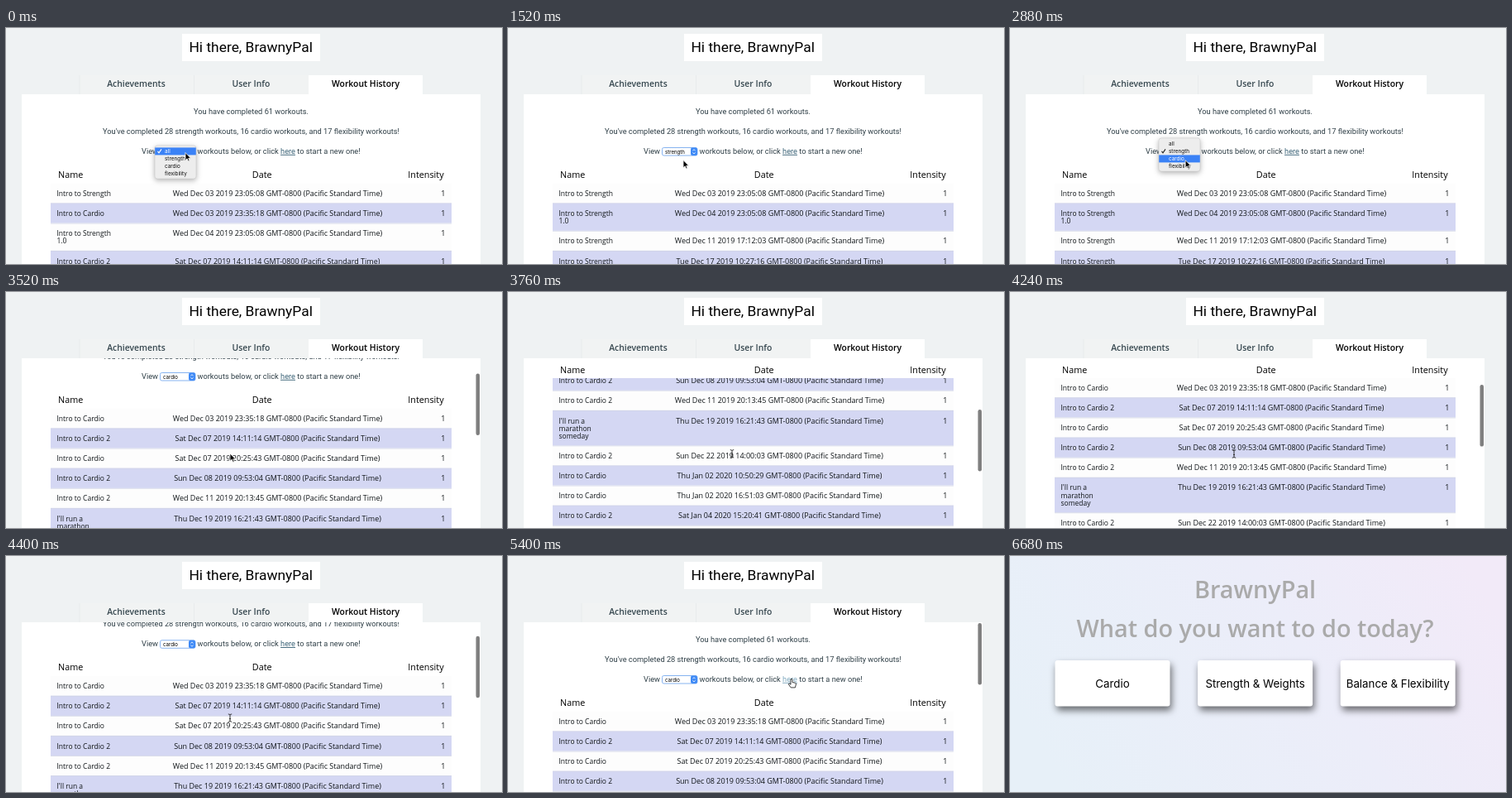
Animation, 600 px wide and 285 px high, one loop 7480 ms. Source, as an HTML page:

```html
<!DOCTYPE html>
<html lang="en">
<head>
<meta charset="utf-8">
<title>Workout history</title>
<style>
  html, body { margin: 0; width: 100%; height: 100%; overflow: hidden; }
  svg { display: block; width: 600px; height: 285px; }
  text { white-space: pre; }
  .mid { text-anchor: middle; }
  .end { text-anchor: end; }
  .hello { font: 17.4px Roboto, sans-serif; }
  .tab { font: 600 10.4px "Open Sans", sans-serif; fill: #36474f; }
  .copy { font: 9.25px Roboto, sans-serif; fill: #2f3f47; }
  .head { font: 10.8px "Open Sans", sans-serif; }
  .name { font: 8.5px "Open Sans", sans-serif; fill: #101518; }
  .date { font: 9px "Open Sans", sans-serif; fill: #101518; }
  .menu { font: 6.4px Inter, sans-serif; }
  .value { font: 6.1px Inter, sans-serif; }
  .title { font: 600 28.8px "Open Sans", sans-serif; fill: #aaa; }
  .card rect { fill: #fff; filter: drop-shadow(2.5px 5px 4px rgba(0, 0, 0, .55)); }
  .card text { font: 13.3px Inter, sans-serif; text-anchor: middle; }
  #popup { filter: drop-shadow(0 2px 3px rgba(0, 0, 0, .3)); }
  #link { text-decoration: underline; }
</style>
</head>
<body>
<svg viewBox="0 0 600 285">
  <defs>
    <clipPath id="panel"><path d="M19 80H574V285H19Z"/></clipPath>
    <linearGradient id="sky" x1="0" y1=".6" x2="1" y2=".3">
      <stop offset="0" stop-color="#e7f0f8"/>
      <stop offset=".6" stop-color="#ecedf9"/>
      <stop offset="1" stop-color="#f2eaf8"/>
    </linearGradient>
  </defs>

  <g id="history">
    <path fill="#eff2f3" d="M0 0H600V285H0Z"/>
    <path fill="#fff" d="M213 7H380V40H213Z"/>
    <text class="hello mid" x="296.2" y="29">Hi there, BrawnyPal</text>
    <path fill="#f1f3f3" d="M89 57H366V80H89Z"/>
    <path stroke="#e8ebec" d="M89 57V80M227.5 57V80"/>
    <path fill="#fff" d="M366 57H504V80H366ZM19 80H574V285H19Z"/>
    <text class="tab mid" x="157.5" y="71.3">Achievements</text>
    <text class="tab mid" x="296.5" y="71.3">User Info</text>
    <text class="tab mid" x="435" y="71.3" style="fill:#000">Workout History</text>

    <g clip-path="url(#panel)">
      <g id="content">
        <text class="copy mid" x="296.5" y="103.8">You have completed 61 workouts.</text>
        <text class="copy mid" x="296.5" y="127.8">You've completed 28 strength workouts, 16 cardio workouts, and 17 flexibility workouts!</text>
        <text class="copy" x="164" y="151.8">View</text>
        <text class="copy" x="231.5" y="151.8">workouts below, or click <tspan id="link">here</tspan> to start a new one!</text>
        <rect x="186.5" y="144.5" width="42.5" height="9.5" rx="2" fill="#fff" stroke="#86b3f0"/>
        <rect x="221" y="144.5" width="8" height="9.5" rx="2" fill="#3f8af6"/>
        <path fill="none" stroke="#fff" stroke-width=".8" d="M223.5 148.3L225 146.6L226.5 148.3M223.5 150.3L225 152L226.5 150.3"/>
        <text id="value" class="value" x="190" y="151.5"></text>
        <g id="tables"></g>
      </g>
      <g id="header">
        <path fill="#fff" d="M54 163H539V187H54Z"/>
        <text class="head" x="63" y="180.8">Name</text>
        <text class="head mid" x="309.7" y="180.8">Date</text>
        <text class="head end" x="529.6" y="180.8">Intensity</text>
      </g>
      <rect id="thumb" x="568.5" width="4.5" height="74.5" rx="2.2" fill="#7f7f7f"/>
    </g>

    <g id="popup">
      <rect x="180" width="50" height="40" rx="3" fill="#ededed" stroke="#c4c4c4" stroke-width=".5"/>
      <rect id="bar" x="180.2" width="49.6" height="9" fill="#3b82f6"/>
      <path id="check" fill="none" stroke-width="1.1" d="M183.5 6.8L185 8.8L188 4.4"/>
      <g id="items"></g>
    </g>
  </g>

  <g id="picker">
    <path fill="url(#sky)" d="M0 0H600V285H0Z"/>
    <text class="title mid" x="296.5" y="51">BrawnyPal</text>
    <text class="title mid" x="296.5" y="97.6">What do you want to do today?</text>
    <g id="cards"></g>
  </g>

  <g id="cursor" stroke-linejoin="round">
    <path id="arrow" stroke="#fff" stroke-width=".8" d="M0 0V9.3L2.1 7.3L3.6 10.6L5.1 9.9L3.7 6.8H6.6Z"/>
    <path id="beam" fill="none" stroke="#222" stroke-width=".9" d="M-2.2 -4.5Q0 -4.5 0 -3.3Q0 -4.5 2.2 -4.5M0 -3.3V3.6M-2.2 4.8Q0 4.8 0 3.6Q0 4.8 2.2 4.8M-1 1.2H1"/>
    <path id="hand" fill="#fff" stroke="#111" stroke-width=".8" d="M-1 -1.5Q0 -3.2 1 -1.5V2L4.6 2.8Q5.6 3.1 5.4 4.5L4.4 8.4H-.8L-3.6 4.6Q-3.6 3.2 -2.3 3.6L-1 4.8Z"/>
  </g>
</svg>

<script>
const LOOP = 7480, PICK1 = 880, OPEN2 = 2080, PICK2 = 3080, NAVIGATE = 5440;
const ROW = 24.1, LINE = 9.2, TOP = 187.5, STICKY = 83;
const $ = id => document.getElementById(id);
const show = (id, on) => $(id).setAttribute('visibility', on ? 'inherit' : 'hidden');
const shift = (id, x, y) => $(id).setAttribute('transform', `translate(${x} ${y})`);

const options = ['all', 'strength', 'cardio', 'flexibility'];
const S = 'Intro to Strength', S1 = S + '|1.0', C = 'Intro to Cardio', C2 = C + ' 2';
const workouts = {
  all: [
    [S, 'Wed Dec 03 2019 23:05:08'], [C, 'Wed Dec 03 2019 23:35:18'],
    [S1, 'Wed Dec 04 2019 23:05:08'], [C2, 'Sat Dec 07 2019 14:11:14']
  ],
  strength: [
    [S, 'Wed Dec 03 2019 23:05:08'], [S1, 'Wed Dec 04 2019 23:05:08'],
    [S, 'Wed Dec 11 2019 17:12:03'], [S, 'Tue Dec 17 2019 10:27:16']
  ],
  cardio: [
    [C, 'Wed Dec 03 2019 23:35:18'], [C2, 'Sat Dec 07 2019 14:11:14'],
    [C, 'Sat Dec 07 2019 20:25:43'], [C2, 'Sun Dec 08 2019 09:53:04'],
    [C2, 'Wed Dec 11 2019 20:13:45'], ["I'll run a|marathon|someday", 'Thu Dec 19 2019 16:21:43'],
    [C2, 'Sun Dec 22 2019 14:00:03'], [C, 'Thu Jan 02 2020 10:50:29'],
    [C, 'Thu Jan 02 2020 16:51:03'], [C2, 'Sat Jan 04 2020 15:20:41'],
    [C, 'Mon Jan 06 2020 18:02:37']
  ]
};

function table(kind) {
  let y = TOP;
  const rows = workouts[kind].map(([name, date], i) => {
    const lines = name.split('|'), h = ROW + LINE * (lines.length - 1), base = y + 15.5;
    const row = `<rect x="54" y="${y}" width="485" height="${h}" fill="${i % 2 ? '#d4d7f3' : '#fdfdfd'}"/>` +
      lines.map((s, n) => `<text class="name" x="61.5" y="${base + n * LINE}">${s}</text>`).join('') +
      `<text class="date mid" x="328.5" y="${base}">${date} GMT-0800 (Pacific Standard Time)</text>` +
      `<text class="date end" x="531.5" y="${base}">1</text>`;
    y += h;
    return { row, line: `M54 ${y + .3}H539` };
  });
  return `<g id="${kind}">${rows.map(r => r.row).join('')}` +
    `<path stroke="#d0d3e6" stroke-width=".8" d="${rows.map(r => r.line).join('')}"/></g>`;
}

$('tables').innerHTML = Object.keys(workouts).map(table).join('');
$('items').innerHTML = options.map((s, i) =>
  `<text class="menu" x="192" y="${9.2 + 9 * i}">${s}</text>`).join('');
$('cards').innerHTML = ['Cardio', 'Strength &amp; Weights', 'Balance &amp; Flexibility'].map((s, i) =>
  `<g class="card" transform="translate(${124 + 172.6 * i} 153.7)">` +
  `<rect x="-69.5" y="-27.7" width="139" height="55.4" rx="3"/><text y="5.3">${s}</text></g>`).join('');
const card = $('cards').children[1];

// Keys are [time, ...values]
const pointer = [
  [0, 217, 150.5], [760, 212, 158], [1000, 212, 158], [1480, 212, 159.5], [1560, 212, 159.5],
  [2040, 215, 150], [2320, 215, 150], [2960, 212, 160], [3120, 212, 160], [3360, 271, 195],
  [4680, 271, 195.5], [5400, 343, 150.5], [6240, 343, 150.5], [6640, 349, 224]
];
const scrolling = [[3400, 0], [3520, 46.5], [3760, 165], [3920, 165], [4040, 136], [4400, 43], [4560, 0]];
const hover = [[NAVIGATE, 1], [5640, 1.2], [6440, 1.2], [6640, 1]];

const smooth = p => p * p * (3 - 2 * p);
function at(keys, t, ease = p => p) {
  const i = keys.findIndex(k => k[0] > t);
  if (i < 1) return keys.at(i).slice(1);
  const a = keys[i - 1], b = keys[i], p = ease((t - a[0]) / (b[0] - a[0]));
  return a.slice(1).map((v, n) => v + (b[n + 1] - v) * p);
}

function drawPopup(chosen, y) {
  const top = 142 - 9 * chosen;
  const active = Math.max(0, Math.min(3, Math.floor((y - top - 2) / 9)));
  shift('popup', 0, top);
  $('bar').setAttribute('y', 2.4 + 9 * active);
  shift('check', 0, 9 * chosen);
  $('check').setAttribute('stroke', active === chosen ? '#fff' : '#222');
  [...$('items').children].forEach((el, i) => el.setAttribute('fill', i === active ? '#fff' : '#111'));
}

function draw(t) {
  const [x, y] = at(pointer, t, smooth);
  const [scroll] = at(scrolling, t);
  const onHistory = t < NAVIGATE;
  const chosen = t < PICK1 ? 0 : t < PICK2 ? 1 : 2;

  show('history', onHistory);
  show('picker', !onHistory);
  Object.keys(workouts).forEach((kind, i) => show(kind, i === chosen));
  $('value').textContent = options[chosen];
  $('link').setAttribute('fill', t > 5320 ? '#7fa9bf' : '#3c6478');
  shift('content', 0, -scroll);
  shift('header', 0, -Math.min(scroll, STICKY));
  show('thumb', t >= 3400);
  $('thumb').setAttribute('y', 81 + scroll * .37);

  show('popup', t < PICK1 || (t >= OPEN2 && t < PICK2));
  drawPopup(chosen, y);

  const [k] = at(hover, t);
  card.setAttribute('transform', `translate(296.6 153.7) scale(${k})`);

  const shape = t >= 5280 && t < 6440 ? 'hand' : t >= 3760 && t < 4800 ? 'beam' : 'arrow';
  ['arrow', 'beam', 'hand'].forEach(id => show(id, id === shape));
  show('cursor', t < 6680);
  shift('cursor', x, y);
}

const start = performance.now();
function tick(now) {
  draw(Math.max(0, now - start) % LOOP);
  requestAnimationFrame(tick);
}
draw(0);
requestAnimationFrame(tick);
</script>
</body>
</html>
```
